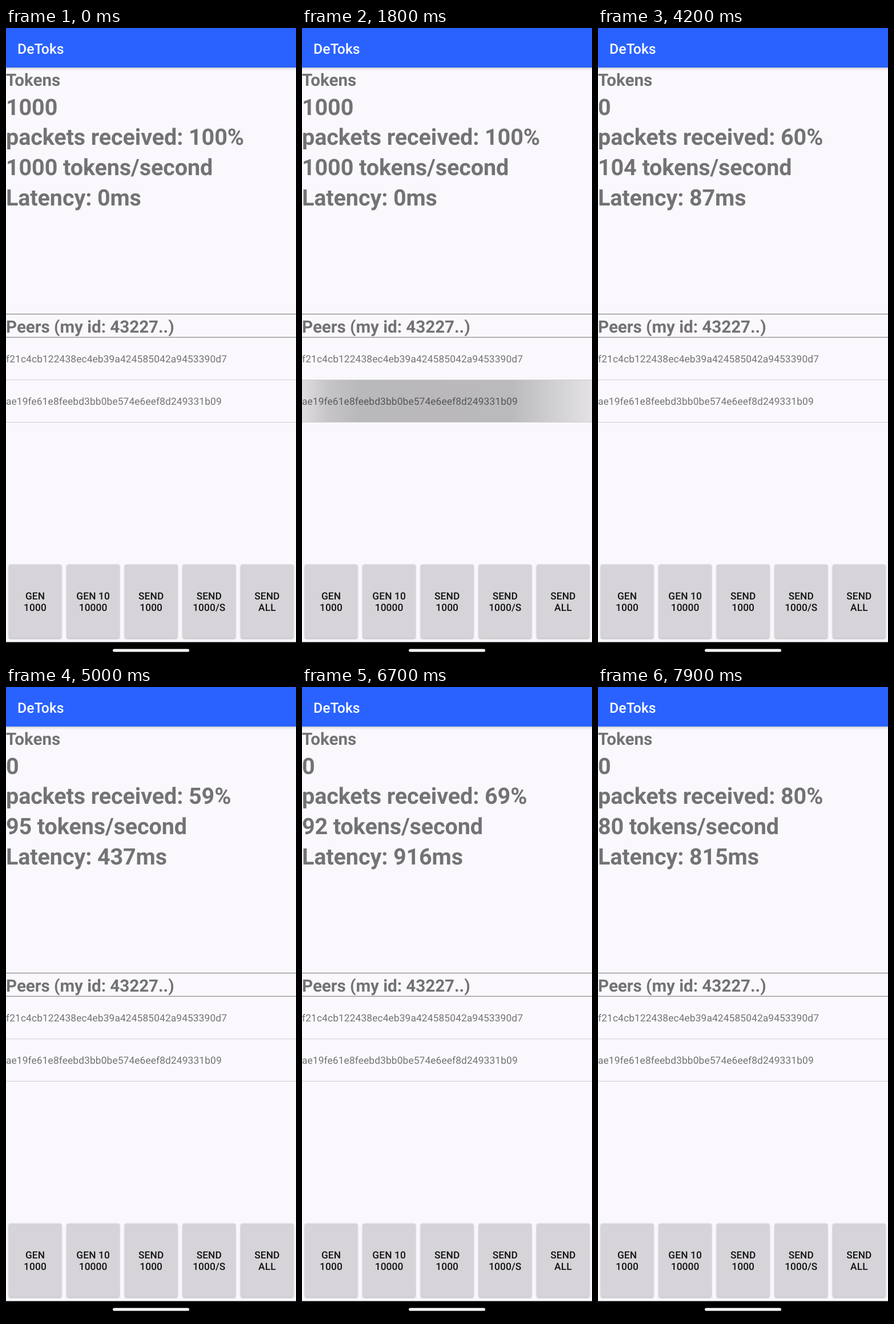
Recreate the animation shown at these times as an HTML page. Size 508 px wide and 1102 px high, loop 8000 ms.

```html
<!DOCTYPE html>
<html lang="en">
<head>
<meta charset="utf-8">
<title>Token transfer</title>
<style>
  html, body { margin: 0; width: 100%; height: 100%; overflow: hidden; background: #faf8fc; }
  svg { display: block; width: 508px; height: 1102px; }
  text { font-family: Roboto, sans-serif; fill: rgba(0, 0, 0, .54); text-rendering: geometricPrecision; }
  .title { font-size: 24.7px; font-weight: 500; fill: #fff; }
  .head { font-size: 29.63px; font-weight: 700; letter-spacing: -.05px; }
  .stat { font-size: 39.51px; font-weight: 700; letter-spacing: -.1px; }
  .peer { font-size: 17.29px; letter-spacing: .15px; }
  .label { font-size: 17.29px; font-weight: 500; letter-spacing: .12px; fill: #111; text-anchor: middle; }
  .bar { fill: #2962ff; filter: drop-shadow(0 1.5px 2px rgba(0, 0, 0, .28)); }
  .button { fill: #d6d4d8; filter: drop-shadow(0 1.5px 1.5px rgba(0, 0, 0, .32)); }
  .rule { fill: #858487; }
  .divider { fill: #cfcdd1; }
</style>
</head>
<body>
<svg viewBox="0 0 508 1102">
  <defs>
    <linearGradient id="ripple">
      <stop offset="0" stop-opacity=".11"/>
      <stop offset=".09" stop-opacity=".21"/>
      <stop offset=".2" stop-opacity=".26"/>
      <stop offset=".72" stop-opacity=".255"/>
      <stop offset=".86" stop-opacity=".17"/>
      <stop offset="1" stop-opacity=".09"/>
    </linearGradient>
  </defs>
  <rect width="508" height="1102" fill="#faf8fc"/>
  <rect class="bar" x="-6" y="-6" width="520" height="75"/>
  <text class="title" x="20" y="44.5">DeToks</text>

  <text class="head" x="0" y="101.3">Tokens</text>
  <g id="stats"></g>

  <rect class="rule" y="499" width="508" height="1.2"/>
  <rect class="rule" y="539.6" width="508" height="1.2"/>
  <text class="head" x="0" y="531.5">Peers (my id: 43227..)</text>

  <rect id="row" y="614" width="508" height="75" fill="url(#ripple)" opacity="0"/>
  <rect class="divider" y="614" width="508" height="1"/>
  <rect class="divider" y="688" width="508" height="1"/>
  <text class="peer" x="0" y="584.1">f21c4cb122438ec4eb39a424585042a9453390d7</text>
  <text class="peer" x="0" y="658.3">ae19fe61e8feebd3bb0be574e6eef8d249331b09</text>

  <g id="buttons"></g>
  <rect y="1072.5" width="508" height="30"/>
  <rect x="187" y="1084.5" width="134" height="5" rx="2.5" fill="#fff"/>
</svg>
<script>
  const LOOP = 8000, STEP = 100;
  const $ = id => document.getElementById(id);

  function add(parent, tag, attrs, content = '') {
    const node = document.createElementNS('http://www.w3.org/2000/svg', tag);
    for (const key in attrs) node.setAttribute(key, attrs[key]);
    node.textContent = content;
    return parent.appendChild(node);
  }

  const stats = [0, 1, 2, 3].map(i =>
    add($('stats'), 'text', { class: 'stat', x: 0, y: 151.7 + i * 52.7 }));

  const labels = [['GEN', '1000'], ['GEN 10', '10000'], ['SEND', '1000'], ['SEND', '1000/S'], ['SEND', 'ALL']];
  const buttons = labels.map((lines, i) => {
    const x = 5 + i * 101.6;
    const box = add($('buttons'), 'rect', { class: 'button', x, y: 937, width: 92, height: 128.5, rx: 2.5 });
    lines.forEach((line, n) =>
      add($('buttons'), 'text', { class: 'label', x: x + 46, y: 998 + n * 20.2 }, line));
    return box;
  });
  const sendAll = buttons[4];

  // Piecewise linear value through [time, value] points.
  function track(points, t) {
    if (t <= points[0][0]) return points[0][1];
    for (let i = 1; i < points.length; i++) {
      const [t0, a] = points[i - 1], [t1, b] = points[i];
      if (t <= t1) return a + (b - a) * (t - t0) / (t1 - t0);
    }
    return points[points.length - 1][1];
  }

  const received = [[4400, 60], [5700, 57], [6700, 69], [7900, 80]];
  const rate = [[4400, 104], [5700, 84], [6700, 92], [7900, 80]];
  const latency = [[4400, 87], [5700, 845], [6700, 916], [7900, 815]];
  const rowFade = [[1600, 0], [1700, .55], [1800, 1], [2000, 1], [2300, 0]];
  const lift = [[3300, 0], [3400, 1], [3700, 1], [4000, 0]];
  const press = [[3400, 0], [3500, 1], [3600, 1], [4000, 0]];

  function draw(t) {
    const sent = t >= 3800;
    const at = points => Math.round(track(points, t));
    const lines = [
      sent ? '0' : '1000',
      `packets received: ${sent ? at(received) : 100}%`,
      `${sent ? at(rate) : 1000} tokens/second`,
      `Latency: ${sent ? at(latency) : 0}ms`
    ];
    lines.forEach((line, i) => {
      if (stats[i].textContent !== line) stats[i].textContent = line;
    });

    $('row').setAttribute('opacity', track(rowFade, t));

    const depth = 1.5 + 1.7 * track(lift, t);
    const shade = 10 * track(press, t);
    sendAll.style.filter = `drop-shadow(0 ${depth}px ${depth}px rgba(0,0,0,.32))`;
    sendAll.style.fill = `rgb(${214 - shade},${212 - shade},${216 - shade})`;
  }

  const start = performance.now();
  function tick() {
    const t = (performance.now() - start) % LOOP;
    draw(Math.floor(t / STEP) * STEP);
    requestAnimationFrame(tick);
  }
  tick();
</script>
</body>
</html>
```
